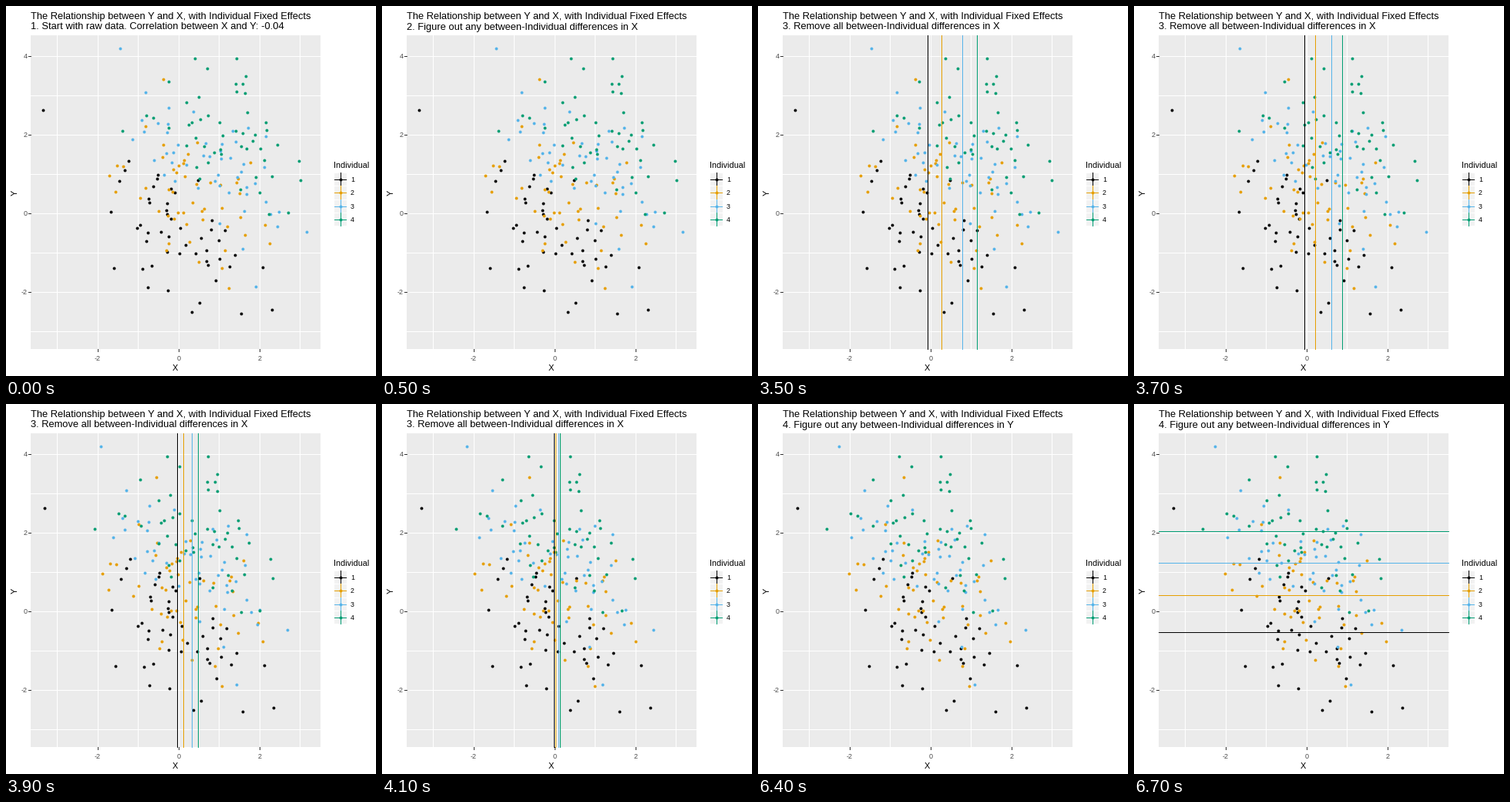
Write a matplotlib script that moves like this. It is 480 by 480 pixels and loops after 8 s.

```python
import math

import matplotlib.pyplot as plt
import numpy as np
from matplotlib.animation import FuncAnimation
from matplotlib.patches import Rectangle

SIZE, DPI = 480, 80
PT = 72 / DPI                      # points per pixel
STEP, LOOP = 100, 8000             # ms
LEFT, TOP, RIGHT, BOTTOM = 32, 38, 408, 445
ZERO_X, ZERO_Y, UNIT_X, UNIT_Y = 223.5, 268.5, 52.5, 51
PER_GROUP = 50
SPREAD, CORRELATION = 1.02, -0.35

TITLE = "The Relationship between Y and X, with Individual Fixed Effects"
STAGES = [
    (0, "1. Start with raw data. Correlation between X and Y: -0.04"),
    (500, "2. Figure out any between-Individual differences in X"),
    (3500, "3. Remove all between-Individual differences in X"),
    (6400, "4. Figure out any between-Individual differences in Y"),
]
# Colour, mean and the most outlying points of each individual.
GROUPS = [
    ("#000000", (-0.06, -0.53), [(-3.34, 2.62), (2.31, -2.46), (1.55, -2.56)]),
    ("#E69F00", (0.29, 0.41), [(-0.37, 3.40), (1.25, -1.91), (-1.55, 0.54)]),
    ("#56B4E9", (0.82, 1.22), [(-1.44, 4.19), (3.17, -0.48), (1.91, -1.87)]),
    ("#009E73", (1.18, 2.02), [(0.41, 3.93), (-1.38, 2.09), (2.71, 0.01)]),
]


def to_px(x, y):
    return ZERO_X + x * UNIT_X, ZERO_Y - y * UNIT_Y


def gaussian_cloud(mean, outliers, rng):
    """Evenly spread normal cloud with a fixed mean, plus its outliers."""
    n = PER_GROUP - len(outliers)
    k = np.arange(n) + rng.uniform(0, 1, n)
    radius = np.sqrt(-2 * np.log(1 - 0.9 * k / n))
    angle = k * math.pi * (3 - math.sqrt(5)) + rng.uniform(0, 2 * math.pi)
    u, v = radius * np.cos(angle), radius * np.sin(angle)
    v = CORRELATION * u + math.sqrt(1 - CORRELATION ** 2) * v
    core = SPREAD * np.column_stack([u, v])
    core += (PER_GROUP * np.array(mean) - np.sum(outliers, axis=0)) / n - core.mean(axis=0)
    return np.vstack([outliers, core])


plt.rcParams["font.family"] = "Liberation Sans"
fig = plt.figure(figsize=(SIZE / DPI, SIZE / DPI), dpi=DPI, facecolor="white")
ax = fig.add_axes([0, 0, 1, 1])
ax.set(xlim=(0, SIZE), ylim=(SIZE, 0))
ax.axis("off")


def rect(x, y, w, h, color, edge="none"):
    ax.add_patch(Rectangle((x, y), w, h, facecolor=color, edgecolor=edge,
                           linewidth=PT, zorder=0))


def line(xs, ys, color, z=1):
    return ax.plot(xs, ys, color=color, lw=PT, zorder=z, antialiased=False,
                   solid_capstyle="butt")[0]


def label(x, y, text, size, color="black", **kw):
    return ax.text(x, y, text, fontsize=size * PT, color=color, **kw)


def dots(xy, color):
    return ax.scatter(*np.transpose(xy), s=(3.9 * PT) ** 2, c=color,
                      linewidths=0, zorder=2)


def draw_panel():
    rect(LEFT, TOP, RIGHT - LEFT, BOTTOM - TOP, "#EBEBEB")
    for v in range(-3, 5):
        x, y = to_px(v, v)
        line([LEFT, RIGHT], [y, y], "white")
        if v < 4:
            line([x, x], [TOP, BOTTOM], "white")
        if v % 2 == 0:
            line([LEFT - 3, LEFT], [y, y], "#333333")
            label(27.5, y + 4, str(v), 9, "#4D4D4D", ha="right")
        if v % 2 == 0 and v < 4:
            line([x, x], [BOTTOM, BOTTOM + 3], "#333333")
            label(x + 0.5, 460, str(v), 9, "#4D4D4D", ha="center")
    label(219.5, 473, "X", 11, ha="center")
    label(11.5, 242, "Y", 11, rotation=90, ha="center", va="center")


def draw_legend():
    key = 17.28
    label(425, 210, "Individual", 10.7)
    for i, (color, _, _) in enumerate(GROUPS):
        top = 216 + key * i
        mid = math.floor(top + key / 2) + 0.5
        rect(424.5, top, key, key, "#F2F2F2", "white")
        line([433.5, 433.5], [top, top + key], color)
        line([426, 441], [mid, mid], color)
        dots([(433.5, mid)], color)
        label(447, mid + 3.2, str(i + 1), 8.8)


draw_panel()
draw_legend()
label(32, 17, TITLE, 12.9)
subtitle = label(32, 30.5, "", 12.9)

rng = np.random.default_rng(5)
series = []
for color, mean, outliers in GROUPS:
    xy = gaussian_cloud(mean, outliers, rng)
    mx, my = to_px(*mean)
    series.append((xy, mean[0], dots(xy, color),
                   line([mx, mx], [TOP, BOTTOM], color, 3),
                   line([LEFT, RIGHT], [my, my], color, 3)))


def update(frame):
    t = frame * STEP
    subtitle.set_text([text for start, text in STAGES if t >= start][-1])
    progress = min(max((t - 3400) / 900, 0), 1)
    eased = (1 - math.cos(math.pi * progress)) / 2
    for xy, mean_x, cloud, x_line, y_line in series:
        shift = mean_x * eased
        cloud.set_offsets(np.column_stack(to_px(xy[:, 0] - shift, xy[:, 1])))
        x_line.set_xdata([to_px(mean_x - shift, 0)[0]] * 2)
        x_line.set_visible(800 <= t < 6400)
        y_line.set_visible(t >= 6700)
    return []


anim = FuncAnimation(fig, update, frames=LOOP // STEP, interval=STEP,
                     repeat=True, repeat_delay=0, blit=False)
plt.show()
```
